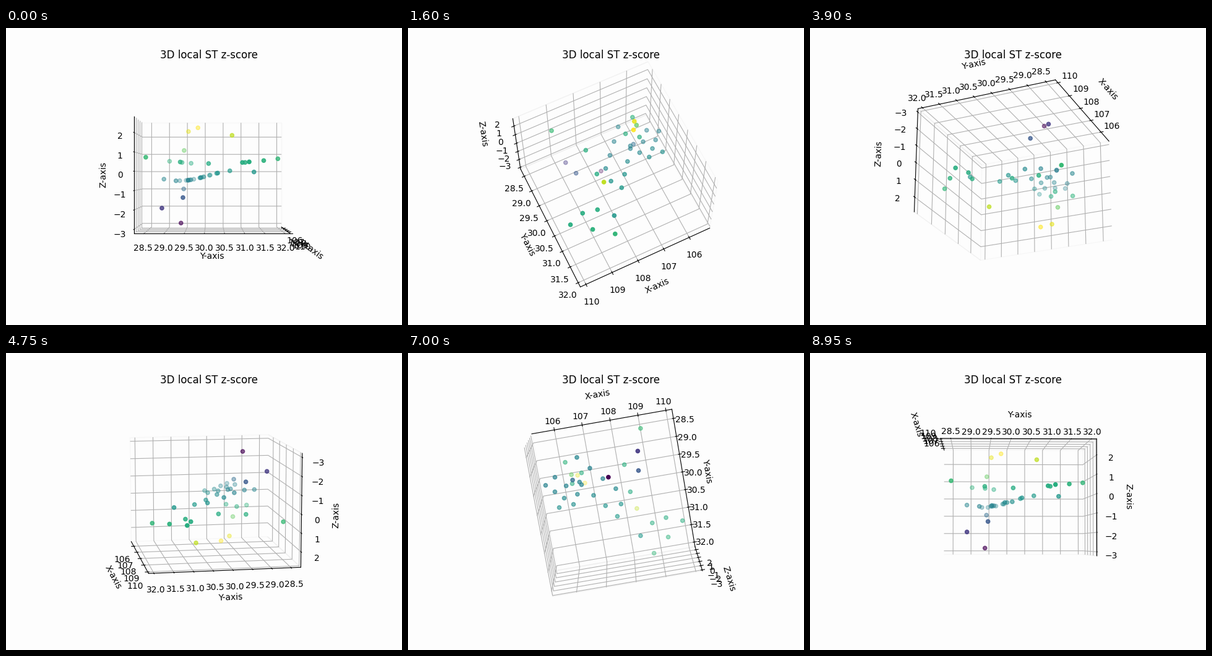
These frames come from a looping animation (640 by 480 pixels, 9 s). A matplotlib script:

```python
import matplotlib.pyplot as plt
import numpy as np
from matplotlib.animation import FuncAnimation

FRAMES = 180
INTERVAL = 50
STEP = 360 / FRAMES
PAPER = "#fdfdfd"

# Rows of evenly spaced stations: start (x, y), end (x, y), count
LOW_ROWS = [
    ((105.507, 29.47), (106.31, 30.12), 4),
    ((105.87, 29.30), (106.51, 29.86), 3),
    ((106.71, 29.62), (107.71, 30.66), 4),
    ((106.72, 28.89), (107.83, 29.89), 4),
    ((105.81, 30.14), (106.66, 29.54), 2),
    ((107.91, 30.34), (108.38, 31.28), 2),
]
HIGH_ROWS = [
    ((109.894, 31.12), (108.73, 31.886), 3),
    ((108.85, 31.04), (109.35, 30.96), 2),
    ((109.01, 28.494), (108.25, 29.36), 2),
    ((106.26, 29.03), (106.75, 29.38), 2),
    ((106.37, 29.62), (108.29, 30.10), 2),
]
# Stations that stand out: x, y, z-score
PEAKS = [
    (106.54, 29.55, 2.25), (106.74, 29.81, 2.446), (108.40, 30.71, 1.94),
    (106.37, 29.43, 1.19), (106.46, 29.42, -0.98), (108.70, 29.44, -1.40),
    (108.79, 28.90, -1.96), (107.70, 29.37, -2.825),
]


def low_score(y):
    return -0.23 - 0.29 * np.cos(2 * (y - 29.3))


def high_score(y):
    return 0.42 + 0.1 * (y - 30.3) ** 2


def layer(rows, score):
    plan = np.vstack([np.linspace(*row) for row in rows])
    return np.column_stack([plan, score(plan[:, 1])])


def padded(values):
    """Limits with a 5 % margin and the thin border of the 3D box."""
    low, high = values.min(), values.max()
    half = (high - low) * 1.1 * 25 / 24 / 2
    mid = (low + high) / 2
    return mid - half, mid + half


def signed(angle):
    return angle - 360 if angle > 180 else angle


x, y, z = np.vstack([layer(LOW_ROWS, low_score),
                     layer(HIGH_ROWS, high_score), PEAKS]).T
fig = plt.figure(figsize=(6.4, 4.8), dpi=100, facecolor=PAPER)
ax = fig.add_subplot(projection="3d", facecolor=PAPER)
ax.scatter(x, y, z, c=z, cmap="viridis")
ax.set(xlim=padded(x), ylim=padded(y), zlim=padded(z),
       xlabel="X-axis", ylabel="Y-axis", zlabel="Z-axis")
ax.set_title("3D local ST z-score", x=0.501)
for axis in (ax.xaxis, ax.yaxis, ax.zaxis):
    axis.pane.fill = False


def update(i):
    angle = signed(i * STEP)
    ax.view_init(elev=angle, azim=angle)
    return ()


anim = FuncAnimation(fig, update, frames=FRAMES, interval=INTERVAL,
                     repeat=True, repeat_delay=0)
plt.show()
```
